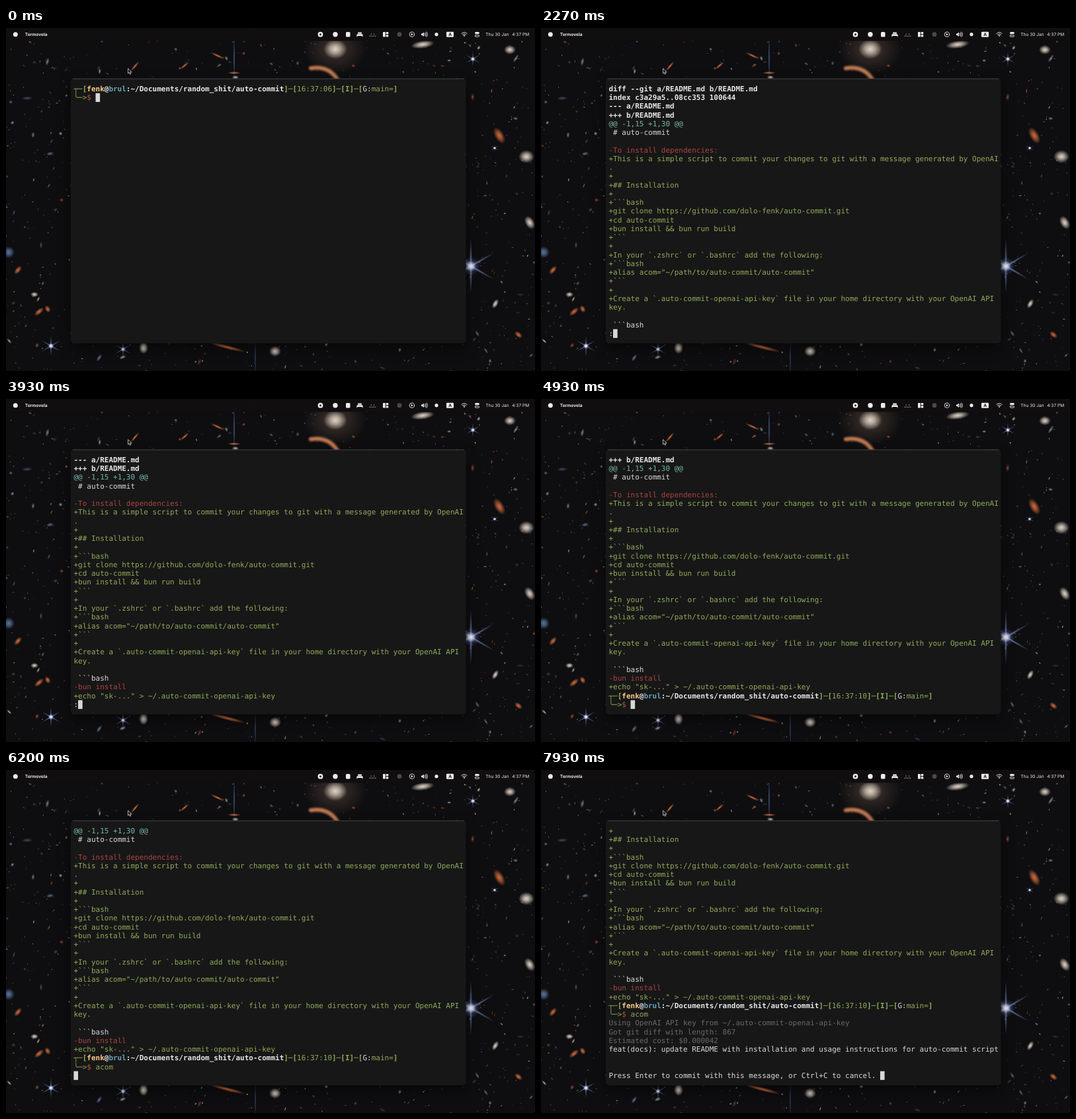
Write an HTML page with a canvas that moves like this. It is 800x520 px and loops after 8000 ms.

```html
<!DOCTYPE html>
<html lang="en">
<head>
<meta charset="utf-8">
<title>Terminal session</title>
<style>
  html, body { margin: 0; width: 100%; height: 100%; overflow: hidden; background: #0e0e10; }
  canvas { display: block; }
</style>
</head>
<body>
<canvas id="stage" width="800" height="520"></canvas>
<script>
const LOOP = 8000;
const W = 800, H = 520;
const LEFT = 102.4, TOP = 85.6, CELL = 6.622, ROW = 13.25, ROWS = 29;
const MONO = '11px "DejaVu Sans Mono", monospace';
const BG = '#171717', GREY = '#686868';

const stage = document.getElementById('stage').getContext('2d');
const backdrop = document.createElement('canvas');
backdrop.width = W;
backdrop.height = H;

// ---------- terminal text: each line is a list of [style, text] ----------
const STYLES = {
  white: ['#d8d8d8'], green: ['#90a959'], red: ['#ac4242'], cyan: ['#75b5aa'], grey: [GREY], hint: ['#555555'],
  dollar: ['#bd5142'], bold: ['#e6e6e6', 1], greenBold: ['#90a959', 1], user: ['#feca88', 1], host: ['#6a9fb5', 1]
};

const prompt = time => [
  ['green', '┬─'], ['greenBold', '['], ['user', 'fenk'], ['bold', '@'], ['host', 'brul'],
  ['bold', ':~/Documents/random_shit/auto-commit'], ['greenBold', ']'], ['green', '─'],
  ['greenBold', '['], ['green', time], ['greenBold', ']'], ['green', '─'], ['greenBold', '[I]'],
  ['green', '─'], ['greenBold', '['], ['white', 'G:'], ['green', 'main='], ['greenBold', ']']
];

function input(typed, hint) {
  const [, command, params] = typed.match(/^(\S*)(.*)$/);
  return [['green', '╰─>'], ['dollar', '$'], ['green', ' ' + command], ['white', params], ['hint', hint]];
}

const diff = `diff --git a/README.md b/README.md
index c3a29a5..08cc353 100644
--- a/README.md
+++ b/README.md
@@ -1,15 +1,30 @@
 # auto-commit

-To install dependencies:
+This is a simple script to commit your changes to git with a message generated by OpenAI
.
+
+## Installation
+
+\`\`\`bash
+git clone https://github.com/dolo-fenk/auto-commit.git
+cd auto-commit
+bun install && bun run build
+\`\`\`
+
+In your \`.zshrc\` or \`.bashrc\` add the following:
+\`\`\`bash
+alias acom="~/path/to/auto-commit/auto-commit"
+\`\`\`
+
+Create a \`.auto-commit-openai-api-key\` file in your home directory with your OpenAI API
key.

 \`\`\`bash
-bun install
+echo "sk-..." > ~/.auto-commit-openai-api-key`.split('\n').map((text, i) => {
  const style = i < 4 ? 'bold' : text[0] === '@' ? 'cyan' : text[0] === '-' ? 'red' :
    text[0] === ' ' ? 'white' : 'green';
  return [[style, text]];
});

const report = [
  'Using OpenAI API key from ~/.auto-commit-openai-api-key',
  'Got git diff with length: 867',
  'Estimated cost: $0.000042'
].map(text => [['grey', text]]);

const message = [
  'feat(docs): update README with installation and usage instructions for auto-commit script',
  '', '', 'Press Enter to commit with this message, or Ctrl+C to cancel. '
].map(text => [['white', text]]);

const EMPTY = [['white', '']];

function typeCommand(command, typedLength, start, step, t) {
  const n = Math.max(0, Math.min(typedLength, Math.floor((t - start) / step) + 1));
  return input(command.slice(0, n), n ? command.slice(n) : '');
}

function screenAt(t) {
  if (t < 1600) return [prompt('16:37:06'), typeCommand('git diff --cached', 9, 200, 90, t)];
  if (t < 4400) {
    const top = t < 3200 ? 0 : t < 3650 ? 1 : 2;
    return [...diff.slice(top, top + ROWS - 1), [['white', ':']]];
  }
  const lines = [...diff, prompt('16:37:10'), typeCommand('acom', 4, 5250, 130, t)];
  if (t >= 7450) lines.push(...report, ...message);
  else if (t >= 6500) lines.push(...report, EMPTY);
  else if (t >= 6050) lines.push(EMPTY);
  return lines.slice(-ROWS);
}

function drawCursor(line, row) {
  const hint = line.find(([style]) => style === 'hint')?.[1] || '';
  const length = line.reduce((sum, [, text]) => sum + text.length, 0) - hint.length;
  const x = LEFT + length * CELL, y = TOP + row * ROW;
  stage.fillStyle = hint ? GREY : '#d8d8d8';
  stage.fillRect(x, y, CELL, ROW);
  if (hint) {
    stage.font = MONO;
    stage.fillStyle = BG;
    stage.fillText(hint[0], x, y + 10.3);
  }
}

function drawScreen(lines) {
  lines.forEach((line, row) => {
    let column = 0;
    for (const [style, text] of line) {
      const [color, bold] = STYLES[style];
      stage.font = (bold ? 'bold ' : '') + MONO;
      stage.fillStyle = color;
      stage.fillText(text, LEFT + column * CELL, TOP + row * ROW + 10.3);
      column += text.length;
    }
  });
  drawCursor(lines.at(-1), lines.length - 1);
}

// ---------- still backdrop: sky, menu bar, window, pointer ----------
function paintBackdrop(c) {
  let seed = 7;
  const random = () => (seed = (seed * 16807) % 2147483647) / 2147483647;

  function glow(x, y, rx, ry, degrees, color, alpha = 1) {
    c.save();
    c.translate(x, y);
    c.rotate(degrees * Math.PI / 180);
    c.scale(rx, ry);
    const shade = c.createRadialGradient(0, 0, 0, 0, 0, 1);
    shade.addColorStop(0, color);
    shade.addColorStop(0.4, color + 'b0');
    shade.addColorStop(1, color + '00');
    c.globalAlpha = alpha;
    c.fillStyle = shade;
    c.fillRect(-1, -1, 2, 2);
    c.restore();
  }
  function star(x, y, size) {
    for (const angle of [30, 90, 150]) glow(x, y, size, size / 26 + 0.4, angle, '#8fa5e8', 0.7);
    glow(x, y, size / 3, size / 3, 0, '#6076c8', 0.6);
    glow(x, y, size / 6 + 1, size / 6 + 1, 0, '#ffffff');
  }

  c.fillStyle = '#0e0e10';
  c.fillRect(0, 0, W, H);
  const tints = ['#c9b6a6', '#a7aec4', '#c8643a', '#e4dcd2', '#7186b0', '#b0512f'];
  for (let i = 0; i < 1300; i++) {
    const r = 0.8 + 2.2 * random() ** 7;
    const stretch = 1 + 2 * random() ** 2;
    glow(random() * W, random() * H, r * stretch, r, random() * 180, tints[i % 6], 0.25 + random() * 0.65);
  }

  const warm = '#d06a3c', pale = '#e0d3c4';
  glow(498, 32, 48, 38, 0, '#8a6a58', 0.35);
  [
    [498, 32, 18, 15, 0, pale], [746, 163, 14, 7, 60, warm], [787, 195, 12, 10, 0, pale],
    [792, 295, 11, 7, 60, pale], [740, 418, 8, 4, -60, pale], [18, 367, 8, 4, -50, warm],
    [50, 430, 9, 4, -40, warm], [63, 426, 6, 4, 60, warm], [43, 404, 6, 4, 0, pale],
    [4, 340, 9, 9, 0, '#56749f'], [345, 68, 10, 2, 0, warm], [270, 57, 9, 2, -40, warm],
    [335, 484, 28, 3, 14, warm], [208, 485, 7, 9, 0, pale], [407, 490, 9, 8, 0, pale],
    [630, 25, 18, 6, -8, pale], [195, 58, 10, 2, -50, warm], [320, 42, 12, 2, 25, warm],
    [762, 33, 9, 7, 0, pale], [775, 465, 7, 4, 40, warm]
  ].forEach(galaxy => glow(...galaxy));
  glow(345, 45, 1.6, 34, 0, '#536da8', 0.7);
  glow(377, 500, 1.4, 28, 0, '#435a90', 0.6);

  c.strokeStyle = '#c07a50';
  c.lineWidth = 6;
  c.lineCap = 'round';
  c.filter = 'blur(1.5px)';
  c.beginPath();
  c.moveTo(461, 61);
  c.quadraticCurveTo(488, 57, 501, 78);
  c.stroke();
  c.filter = 'none';

  star(703, 361, 42);
  star(68, 482, 17);
  star(177, 487, 14);
  star(706, 47, 13);
  star(739, 182, 8);

  paintMenuBar(c);
  paintWindow(c);

  c.fillStyle = '#050505';
  c.strokeStyle = '#e0e0e0';
  c.lineWidth = 0.8;
  const pointer = new Path2D('M184.6 61.8v7.1l1.7-1.5 1.2 2.7 1.2-.6-1.1-2.6h2.2z');
  c.fill(pointer);
  c.stroke(pointer);
}

function paintMenuBar(c) {
  const ink = '#ededed';
  const dot = (x, r, color = ink) => {
    c.fillStyle = color;
    c.beginPath();
    c.arc(x, 9.7, r, 0, 7);
    c.fill();
  };
  const box = (x, y, w, h, r = 0.8) => {
    c.beginPath();
    c.roundRect(x, y, w, h, r);
    c.fill();
  };
  const line = path => c.stroke(new Path2D(path));

  c.fillStyle = 'rgba(17,14,15,0.96)';
  c.fillRect(0, 0, W, 19.5);
  c.textRendering = 'geometricPrecision';
  dot(14.3, 3.5);
  c.font = 'bold 6.6px Inter, sans-serif';
  c.fillText('Termovela', 28.8, 12.1);
  c.font = '6.6px Inter, sans-serif';
  c.fillText('Thu 30 Jan', 725.3, 12.1);
  c.textAlign = 'right';
  c.fillText('4:37 PM', 791.2, 12.1);
  c.textAlign = 'left';

  c.strokeStyle = ink;
  c.lineWidth = 0.9;
  dot(475.5, 3.9);
  dot(475.5, 1.5, '#151314');
  dot(498, 3.7);
  c.fillStyle = ink;
  box(514, 6, 6.5, 7.5, 1.5);
  box(530.5, 9.3, 9, 2.7);
  box(532, 6.5, 6, 2.2);
  c.fillRect(530.5, 11, 0.9, 2.4);
  c.fillRect(538.6, 11, 0.9, 2.4);
  for (let i = 0; i < 5; i++) {
    c.fillRect(549.5 + i * 2.2, 11.7, 1, 1);
    if (i % 2) c.fillRect(549.5 + i * 2.2, 8.6, 1, 1);
  }
  box(570, 6, 3.7, 7.5);
  box(574.6, 6, 3.7, 3.2);
  box(574.6, 10.2, 3.7, 3.3);
  dot(595, 3.4, '#4b494a');
  line('M617.6 9.7a3.7 3.7 0 1 1-7.4 0a3.7 3.7 0 1 1 7.4 0');
  c.fillStyle = ink;
  c.fill(new Path2D('M612.8 7.8l3 1.9-3 1.9z'));
  c.fill(new Path2D('M628 8.5h1.5l2.4-2v6.5l-2.4-2H628z'));
  line('M633.2 8q1.3 1.7 0 3.4M634.6 6.9q2.2 2.8 0 5.6M636 6q3 3.7 0 7.4');
  dot(651, 2.6);
  box(666, 5.8, 11, 7.9, 1.2);
  c.fillStyle = '#1a1819';
  c.font = 'bold 6.5px Inter, sans-serif';
  c.fillText('A', 669.2, 12.1);
  line('M688.8 8.4q4.2-3.8 8.4 0M690.3 10.1q2.7-2.4 5.4 0');
  c.fillStyle = ink;
  c.fill(new Path2D('M691.6 11.4q1.4-1.2 2.8 0l-1.4 1.7z'));
  box(709, 6, 6.8, 3.1, 1.5);
  line('M710.5 10.7h3.8a1 1 0 0 1 0 2.5h-3.8a1 1 0 0 1 0-2.5');
}

function paintWindow(c) {
  c.save();
  c.shadowColor = 'rgba(0,0,0,0.45)';
  c.shadowBlur = 20;
  c.shadowOffsetY = 8;
  c.fillStyle = BG;
  c.beginPath();
  c.roundRect(98, 76.7, 597.5, 401.3, 5);
  c.fill();
  c.restore();
  c.strokeStyle = '#515151';
  c.lineWidth = 0.8;
  c.beginPath();
  c.moveTo(101, 77);
  c.lineTo(692.5, 77);
  c.stroke();
}

function frame(now) {
  stage.drawImage(backdrop, 0, 0);
  drawScreen(screenAt(now % LOOP));
  requestAnimationFrame(frame);
}

stage.textRendering = 'geometricPrecision';
paintBackdrop(backdrop.getContext('2d'));
requestAnimationFrame(frame);
</script>
</body>
</html>
```
